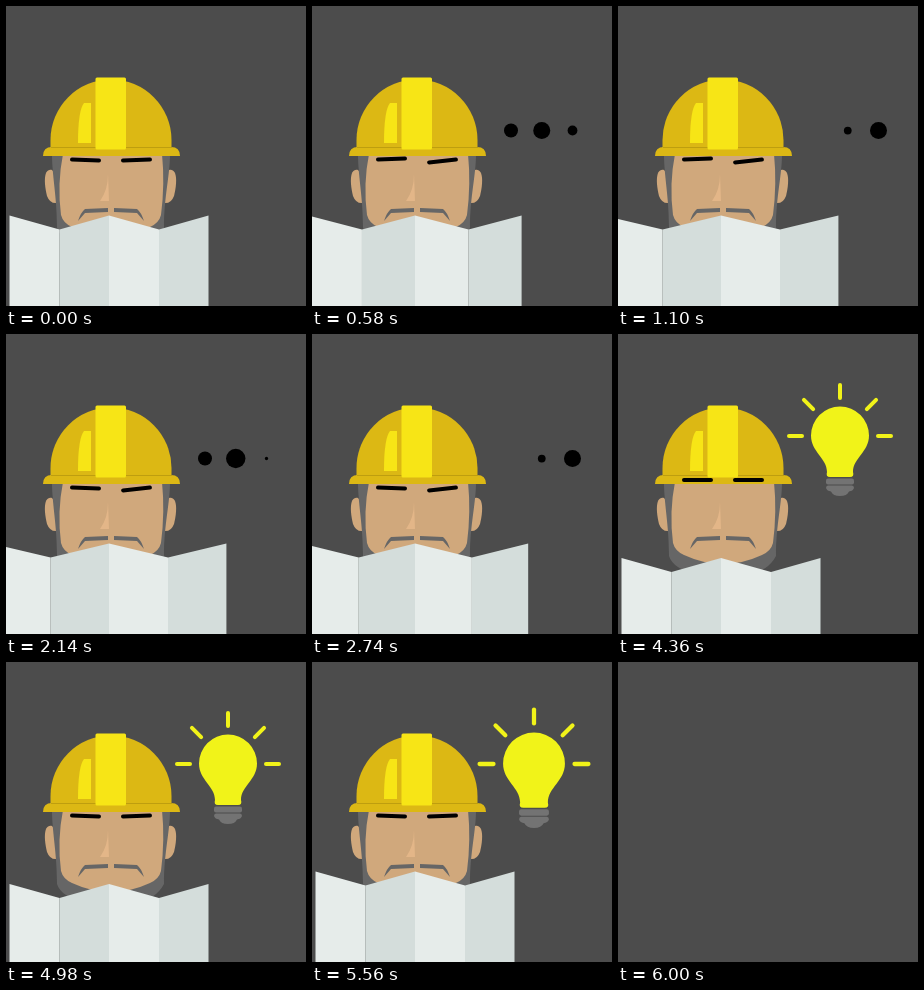
Animation of 300x300 px, one loop 6020 ms. Source, as an HTML page:

```html
<!DOCTYPE html>
<html lang="en">
<head>
<meta charset="utf-8">
<title>Builder has an idea</title>
<style>
html, body { margin: 0; height: 100%; overflow: hidden; background: #4c4c4c; }
svg { display: block; width: 100vw; height: 100vh; }
</style>
</head>
<body>
<svg viewBox="0 0 300 300">
  <g id="man">
    <g fill="#d0a87c">
      <path id="ear" d="M46 164C37 162 38 178 41 190Q44 198 51 197V170Z"/>
      <use href="#ear" transform="matrix(-1 0 0 1 209 0)"/>
    </g>
    <path fill="#666" d="M46 148H164C164 170 158 190 158 222Q150 237 130 241H80Q55 235 51 222C51 190 46 170 46 148Z"/>
    <path fill="#d0a87c" d="M57 148Q51 178 55 209Q57 217 66 221Q105 239 144 221Q153 217 155 209Q159 178 156 148Z"/>
    <path fill="#e3b688" d="M102 168Q102 184 94 195H103Z"/>
    <g fill="#666">
      <path id="stache" d="M102 202L79 203Q75 206 72 215L79 207L102 206Z"/>
      <use href="#stache" transform="matrix(-1 0 0 1 210 0)"/>
    </g>
    <path fill="#dcb814" d="M44.500 142V134A60.500 60.500 0 0 1 165.500 134V142Z"/>
    <path fill="#dcb814" d="M37 150Q37 141 46 141H165Q174 141 174 150Z"/>
    <path stroke="#b6980f" stroke-width=".8" d="M45 141.500H166"/>
    <rect x="89.500" y="71.500" width="30.500" height="72" rx="1.500" fill="#f7e516"/>
    <path fill="#f7e516" d="M72 137C72 115 74 102 78 97H85V137Z"/>
    <g stroke="#000" stroke-width="4" stroke-linecap="round">
      <path id="browL" d="M-13.500 0H13.500"/>
      <path id="browR" d="M-13.500 0H13.500"/>
    </g>
    <g id="paper">
      <path fill="#e6ecea" d="M3.500 209.500L53.500 223.500V330H3.500ZM103 209.500L153 223.500V330H103Z"/>
      <path fill="#d4dddb" d="M53.500 223.500L103 209.500V330H53.500ZM153 223.500L202.500 209.500V330H153Z"/>
    </g>
  </g>
  <g id="dots"></g>
  <g id="bulb">
    <path fill="#f1f319" d="M193 101.500A29 29 0 0 1 251 101.500C251 118 235 124 235 138Q236.500 143 232 143H212Q207.500 143 209 138C209 124 193 118 193 101.500Z"/>
    <g fill="#737373">
      <rect x="208" y="144.500" width="28" height="6" rx="2"/>
      <path d="M210 151.500H234Q236 151.500 236 154Q235 157 231 157.500Q229 162 222 162Q215 162 213 157.500Q209 157 208 154Q208 151.500 210 151.500Z"/>
    </g>
    <g id="rays" stroke="#f1f319" stroke-width="4" stroke-linecap="round"></g>
  </g>
</svg>
<script>
const LOOP = 6020, STEP = 20;
const $ = id => document.getElementById(id);
const clamp = p => Math.min(1, Math.max(0, p));

function add(parent, tag, attrs) {
  const el = document.createElementNS('http://www.w3.org/2000/svg', tag);
  for (const name in attrs) el.setAttribute(name, attrs[name]);
  return $(parent).appendChild(el);
}

function place(el, x, y, rotation, sx, sy = sx) {
  el.setAttribute('transform', `translate(${x} ${y}) rotate(${rotation}) scale(${sx} ${sy})`);
}

// smooth step from 0 to 1
function ramp(t, start, duration) {
  const p = clamp((t - start) / duration);
  return p * p * (3 - 2 * p);
}

// grows past full size, then settles at 1
function swell(p) {
  p = clamp(p);
  return p < .7 ? 1.28 * p / .7 : 1 + .28 * (1 - p) / .3;
}

const dots = [0, 1, 2].map(i => add('dots', 'circle', { cx: 199 + 30.75 * i, cy: 124.5 }));
const rays = [0, 1, 2, 3, 4].map(() => add('rays', 'path', { d: 'M-6.5 0H6.5' }));

function drawMan(t) {
  $('man').style.display = t < 6000 ? '' : 'none';

  const width = 1 + .18 * (ramp(t, 300, 650) - ramp(t, 2620, 380));
  const drop = 14.5 * (ramp(t, 2900, 240) - ramp(t, 4880, 440));
  $('paper').setAttribute('transform',
    `translate(103 ${drop}) scale(${width} 1) translate(-103 0)`);

  const lift = ramp(t, 2900, 240) - ramp(t, 4340, 280);
  const frown = ramp(t, 20, 480) - ramp(t, 2900, 240);
  const doubt = ramp(t, 20, 480) - ramp(t, 1660, 340);
  const y = 154 - 8 * lift, calm = 2 * (1 - lift);
  place($('browL'), 79.5, y - doubt, calm - 4 * doubt, 1);
  place($('browR'), 130.5, y + frown, -calm - 4 * frown, 1);
}

function drawDots(t) {
  const cycle = t < 1660 ? t - 20 : t - 1660;
  dots.forEach((dot, i) => {
    const age = cycle - 220 * i;
    const size = t < 3100 ? swell(age / 380) * clamp((980 - age) / 240) : 0;
    dot.setAttribute('r', (7 + .75 * i) * size);
  });
}

function drawBulb(t) {
  const size = t < 4000 ? swell((t - 2910) / 400) : swell((5820 - t) / 280);
  $('bulb').setAttribute('transform',
    `translate(222 102) scale(${size}) translate(-222 -102)`);
  rays.forEach((ray, i) => {
    const angle = 45 * i - 180, a = angle * Math.PI / 180;
    place(ray, 222 + 44.5 * Math.cos(a), 102 + 44.5 * Math.sin(a), angle,
      swell((t - 3070 - 75 * i) / 240));
  });
}

const start = performance.now();
function tick() {
  const t = Math.floor((performance.now() - start) % LOOP / STEP) * STEP;
  drawMan(t);
  drawDots(t);
  drawBulb(t);
  requestAnimationFrame(tick);
}
tick();
</script>
</body>
</html>
```
